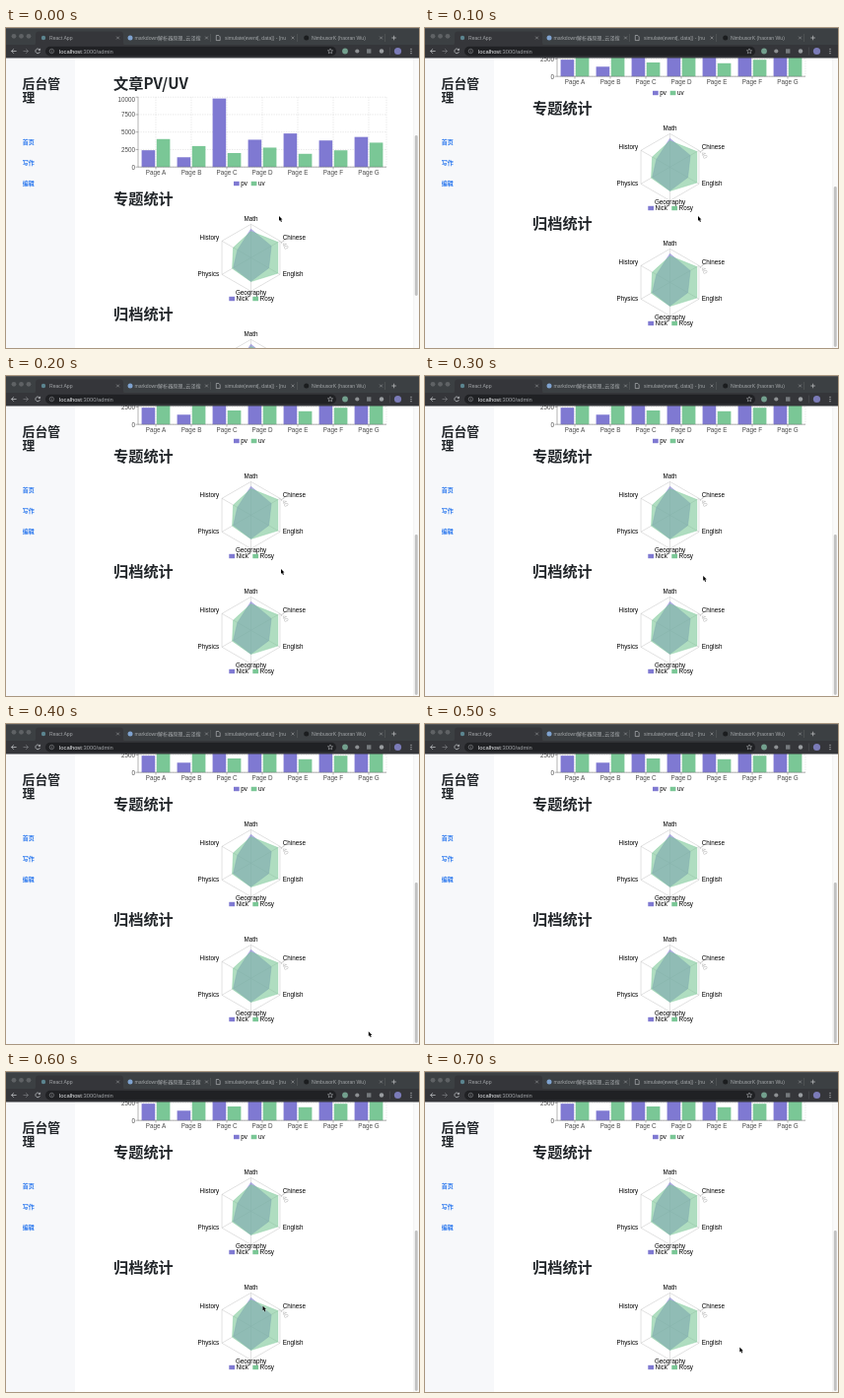
Recreate the animation shown at these times as an HTML page. Size 419 px wide and 325 px high, loop 800 ms.

```html
<!DOCTYPE html>
<html lang="zh">
<head>
<meta charset="utf-8">
<title>Admin dashboard</title>
<style>
  html, body { margin: 0; width: 100%; height: 100%; overflow: hidden; background: #fff; }
  svg { display: block; width: 419px; height: 325px; }
  text { font-family: "Liberation Sans", Arial, "Noto Sans CJK SC", sans-serif; font-size: 6.3px; }
  .cjk { font-family: "Noto Sans CJK SC", "Noto Sans CJK JP", "Noto Sans CJK", sans-serif; font-weight: 700; }
  .head { font-size: 15.2px; fill: #212529; }
  .side { font-size: 12.8px; fill: #212529; }
  .link { font-size: 6px; fill: #2b78ee; }
  .axis { fill: #4c4c4c; }
  .tab { font-size: 5.1px; fill: #a3a6a9; }
  .url { font-size: 5.8px; fill: #a2a5a9; }
</style>
</head>
<body>
<svg id="stage" viewBox="0 0 419 325"></svg>
<script>
const PURPLE = '#7f79d2', GREEN = '#7ac796';
const LOOP = 800, STEP = 100;
const SCROLL = 92;
// Pointer tip for each step; null while it is off the page.
const POINTER = [[277, 191], [277, 191], [279, 196], [282.2, 203],
                 [367.8, 312.3], null, [260.5, 237.5], [319.3, 279.6]];

const rect = (x, y, w, h, fill, more = '') =>
  `<rect x="${x}" y="${y}" width="${w}" height="${h}" fill="${fill}" ${more}/>`;
const dot = (x, y, r, fill) => `<circle cx="${x}" cy="${y}" r="${r}" fill="${fill}"/>`;
const path = (d, stroke, width, more = 'fill="none"') =>
  `<path d="${d}" stroke="${stroke}" stroke-width="${width}" ${more}/>`;
const text = (x, y, str, cls = '', more = '') =>
  `<text x="${x}" y="${y}" class="${cls}" ${more}>${str}</text>`;
const anchor = side => `text-anchor="${side}"`;

const legend = (x, y, color, label) =>
  rect(x, y - 2.2, 5.7, 4.4, color) + text(x + 7.3, y + 2, label);

function barChart() {
  const left = 134, right = 386, base = 141.2, height = 71, band = 36, bar = 13.6;
  const pv = [2400, 1398, 9800, 3908, 4800, 3800, 4300];
  const uv = [4000, 3000, 2000, 2780, 1890, 2390, 3490];
  let grid = '', ticks = `M${left} ${base - height}V${base}H${right}`, labels = '', bars = '';

  for (let i = 0; i <= 4; i++) {
    const y = base - height * i / 4;
    grid += `M${left} ${y}H${right}`;
    ticks += `M${left - 2.4} ${y}h2.4`;
    labels += text(131, y + (i === 4 ? 5.1 : 2.3), i * 2500, 'axis', anchor('end'));
  }
  pv.forEach((value, i) => {
    const x = left + band * i, mid = x + band / 2;
    grid += `M${mid} ${base - height}V${base}`;
    ticks += `M${mid} ${base}v2.4`;
    labels += text(mid, 148.7, 'Page ' + 'ABCDEFG'[i], 'axis', anchor('middle'));
    [[value, PURPLE], [uv[i], GREEN]].forEach(([v, color], k) => {
      const h = height * v / 10000;
      bars += rect(x + 3.6 + k * (bar + 1.6), base - h, bar, h, color);
    });
  });
  grid += `M${right} ${base - height}V${base}`;
  return path(grid, '#ccc', 0.45, 'fill="none" stroke-dasharray="1.25 1.25"') +
    bars + path(ticks, '#666', 0.5) + labels +
    legend(231, 158, PURPLE, 'pv') + legend(248.7, 158, GREEN, 'uv');
}

function radarChart(cy) {
  const cx = 248.5, radius = 34, max = 140;
  const names = ['Math', 'Chinese', 'English', 'Geography', 'Physics', 'History'];
  const sides = ['middle', 'start', 'start', 'middle', 'end', 'end'];
  const first = [120, 98, 86, 99, 85, 65];
  const second = [110, 130, 130, 100, 90, 85];
  const at = (i, r) => {
    const a = Math.PI * i / 3;
    return [cx + r * Math.sin(a), cy - r * Math.cos(a)];
  };
  const ring = values => 'M' + values.map((v, i) => at(i, radius * v / max)).join('L') + 'Z';
  const area = (values, color) =>
    path(ring(values), color, 0.4, `fill="${color}" fill-opacity=".6"`);
  const spokes = names.map((_, i) => `M${cx} ${cy}L${at(i, radius)}`).join('');
  const labels = names.map((name, i) => {
    const [x, y] = at(i, radius + 3.3);
    return text(x, y, name, '', anchor(sides[i]));
  }).join('');
  const [tx, ty] = at(1, radius);

  return path(ring(Array(6).fill(max)) + spokes, '#bdbdbd', 0.45) +
    area(first, PURPLE) + area(second, GREEN) + labels +
    text(0, 0, max, '', `fill="#b5b5b5" transform="translate(${tx} ${ty}) rotate(60)"`) +
    legend(226.3, cy + 41.7, PURPLE, 'Nick') + legend(250.3, cy + 41.7, GREEN, 'Rosy');
}

function page() {
  const head = (y, str) => text(109, y, str, 'cjk head');
  return head(62, '文章PV/UV') + barChart() +
    head(179, '专题统计') + radarChart(233.3) +
    head(296, '归档统计') + radarChart(350.3);
}

function sidebar() {
  return rect(0, 30, 70, 295, '#f7f8fa') +
    text(16.6, 60.8, '后台管', 'cjk side') + text(16.6, 75, '理', 'cjk side') +
    ['首页', '写作', '编辑'].map((s, i) => text(16.8, 118 + 21 * i, s, 'cjk link')).join('');
}

function browser() {
  const cross = x => path(`M${x - 1.4} 8.6l2.8 2.8m0 -2.8l-2.8 2.8`, '#a5a7aa', 0.55);
  const tabs = [
    [44, 'React App'], [130.5, 'markdown解析器原理_云泽搜'],
    [222, 'simulate(event[, data]) - [nu'], [310, 'NimbusorK (haoran Wu)']
  ];
  const lights = [8, 15.5, 23].map(x => dot(x, 8.3, 2.4, '#5f6265')).join('');
  return rect(0, 0, 419, 17.5, '#3c4043') +
    path('M0 0.3H419', '#66696c', 0.6) +
    path('M28 17.5Q30 17.5 30 15V6.5Q30 3.5 33 3.5H116Q119 3.5 119 6.5V15Q119 17.5 121 17.5Z',
      'none', 0, 'fill="#35363a"') +
    rect(0, 17, 419, 13.5, '#35363a') + lights +
    dot(38, 10, 2.2, '#5c8590') + dot(126, 10, 2.5, '#7fa3d0') +
    path('M213.3 7.5h2.5l1.4 1.4v3.7h-3.9z', '#c3c5c8', 0.6) + dot(304.7, 10, 2.5, '#1b1d1f') +
    tabs.map(([x, s]) => text(x, 11.8, s, 'tab')).join('') +
    [113.5, 203.5, 291, 380.5].map(cross).join('') +
    path('M207.5 6v8M295.5 6v8M384.5 6v8', '#5c6063', 0.5) +
    path('M391.3 10h4.6m-2.3 -2.3v4.6', '#c3c5c8', 0.7) +
    // toolbar
    rect(40, 18.7, 295, 9.8, '#202124', 'rx="4.9"') +
    path('M10.6 23.5h-5m2.3 -2.3l-2.3 2.3l2.3 2.3', '#cfd1d4', 0.7) +
    path('M17.5 23.5h5m-2.3 -2.3l2.3 2.3l-2.3 2.3', '#7d8084', 0.7) +
    path('M34.2 22.2a2.3 2.3 0 1 0 .2 2M34.6 20.8v1.7h-1.7', '#cfd1d4', 0.7) +
    path('M44.2 23.5a2.2 2.2 0 1 0 4.4 0a2.2 2.2 0 1 0 -4.4 0M46.4 23.1v1.6M46.4 22v.5', '#a2a5a9', 0.5) +
    text(54, 25.5, '<tspan fill="#eceef0">localhost</tspan>:3000/admin', 'url') +
    path('M329 20.9l.8 1.8l1.8 .1l-1.4 1.2l.5 1.8l-1.7 -1l-1.7 1l.5 -1.8l-1.4 -1.2l1.8 -.1z',
      '#c3c5c8', 0.5) +
    dot(344, 23.5, 2.9, '#73a08e') + dot(356.3, 23.5, 2.1, '#8d9093') +
    rect(366, 21.3, 4.4, 4.4, '#75797d') + dot(381, 23.5, 2.2, '#9a9da1') +
    path('M389.5 19.5v8', '#54565a', 0.5) + dot(397.5, 23.5, 3.6, '#7b7bb8') +
    [21.3, 23.5, 25.7].map(y => dot(411, y, 0.6, '#cfd1d4')).join('');
}

const stage = document.getElementById('stage');
stage.innerHTML =
  rect(0, 0, 419, 325, '#fff') +
  `<g id="page">${page()}</g>` + sidebar() +
  rect(413.6, 30, 5.4, 295, '#fafafa') + path('M413.7 30V325', '#e6e6e6', 0.4) +
  rect(414.8, 109, 2.9, 163, '#c1c1c1', 'rx="1.45" id="thumb"') +
  browser() +
  path('M0 0V4.8L1.1 3.9L2 5.9L2.9 5.5L2 3.6H3.5Z', '#fff', 0.5,
    'id="pointer" fill="#000" paint-order="stroke"');

const [pageEl, thumb, pointer] = ['page', 'thumb', 'pointer'].map(id => document.getElementById(id));

function draw(time) {
  const step = Math.floor((time % LOOP) / STEP);
  const scrolled = step > 0;
  pageEl.setAttribute('transform', `translate(0 ${scrolled ? -SCROLL : 0})`);
  thumb.setAttribute('y', scrolled ? 161 : 109);
  const tip = POINTER[step];
  pointer.style.display = tip ? '' : 'none';
  if (tip) pointer.setAttribute('transform', `translate(${tip})`);
}

let start;
function tick(now) {
  start ??= now;
  draw(now - start);
  requestAnimationFrame(tick);
}
draw(0);
requestAnimationFrame(tick);
</script>
</body>
</html>
```
